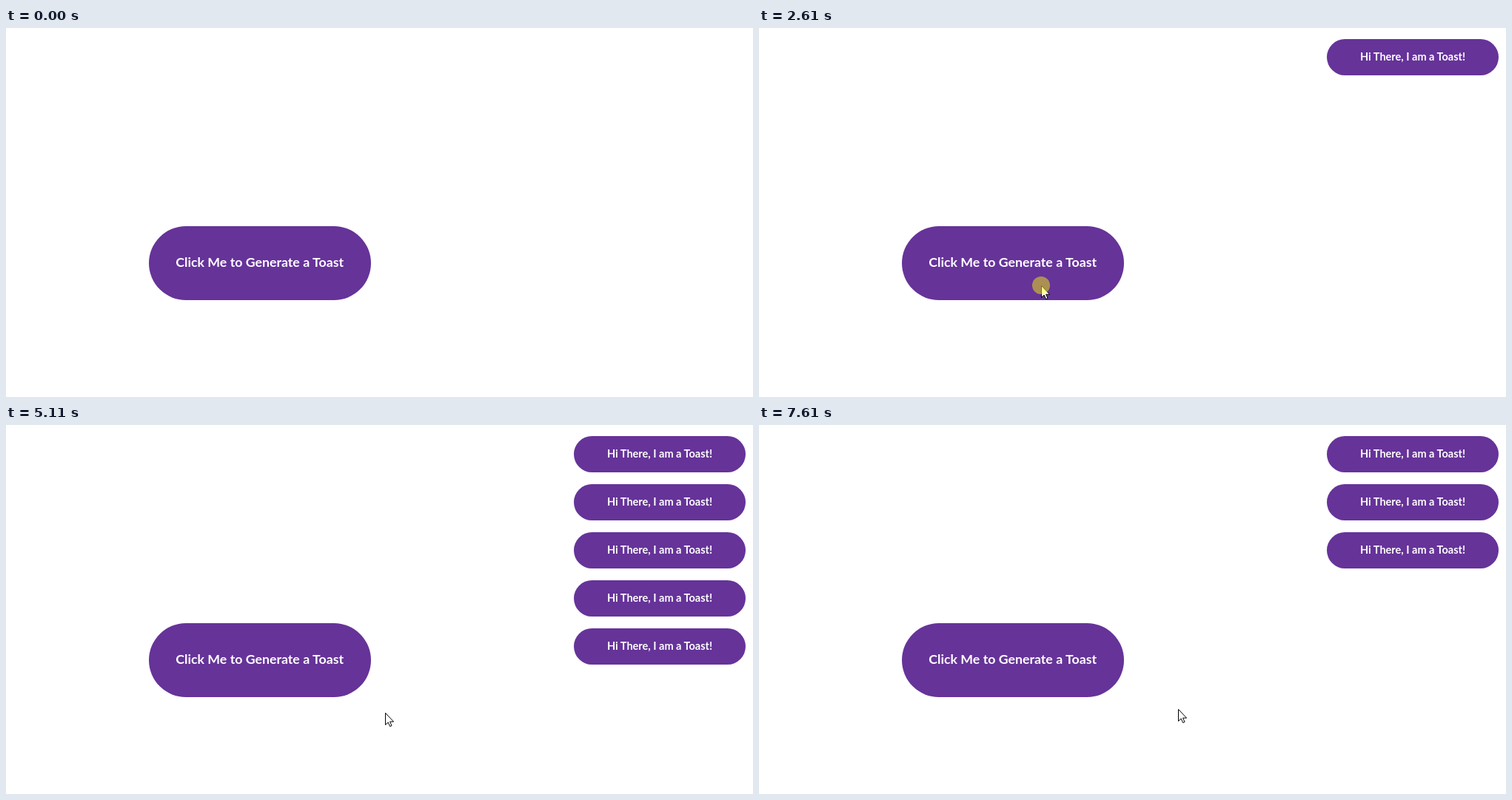
Animation, 1009 px wide and 499 px high, one loop 8000 ms. Source, as an HTML page:

```html
<!DOCTYPE html>
<html lang="en">
<head>
<meta charset="utf-8">
<title>Toasts</title>
<style>
  html, body { margin: 0; width: 100%; height: 100%; overflow: hidden; background: #fff; }
  svg { display: block; width: 1009px; height: 499px; }
  rect { fill: #639; }
  text { fill: #fff; font: 700 17.75px Lato, "Open Sans", sans-serif; text-anchor: middle; }
  .toast text { font-size: 14.5px; }
</style>
</head>
<body>
<svg viewBox="0 0 1009 499">
  <rect x="193" y="268" width="300" height="100" rx="50"/>
  <text x="342.7" y="323">Click Me to Generate a Toast</text>
  <g id="toasts"></g>
  <g id="cursor">
    <path d="M.5 .5V16.5L4.2 13.1L6.6 18.6L9 17.6L6.6 12.2H11.6Z" fill="#fff" stroke="#000" stroke-linejoin="round"/>
    <circle id="press" r="12" fill="#ff0" fill-opacity=".46"/>
  </g>
</svg>
<script>
const LOOP = 8000;
const STEP = 48;         // pace of the cursor
const FIRST_EXIT = 7050; // newest toast leaves first,
const EXIT_GAP = 560;    // the others follow at this interval

// Mouse down and up; every release adds a toast
const clicks = [[1970, 2120], [2610, 2660], [2840, 3120], [3450, 3500], [3910, 3960]];

const moves = [
  { start: 340, end: 390, from: [789, 488], to: [704, 490], gone: 440 },
  { start: 1310, end: 1740, from: [383, 452], to: [381, 348] },
  { start: 4930, end: 5160, from: [393, 351], to: [577, 410] },
  { start: 6590, end: 6820, from: [577, 407], to: [566, 384] }
];

const byId = id => document.getElementById(id);
const show = (el, on) => el.setAttribute("visibility", on ? "visible" : "hidden");
const smooth = u => u * u * (3 - 2 * u);

byId("toasts").innerHTML = clicks.map((_, i) =>
  `<g class="toast" transform="translate(767 ${15 + 65 * i})">
    <rect width="232" height="49" rx="24.5"/>
    <text x="116" y="29">Hi There, I am a Toast!</text>
  </g>`).join("");
const toasts = [...byId("toasts").children];

function cursorAt(t) {
  const move = moves.findLast(m => t >= m.start);
  if (!move || t >= move.gone) return null;
  const { start, end, from, to } = move;
  const steps = Math.round((end - start) / STEP);
  const step = Math.floor((t - start) / (end - start) * steps + 0.01);
  const k = smooth(Math.min(1, step / steps));
  return from.map((v, i) => Math.round(v + (to[i] - v) * k));
}

function draw(t) {
  toasts.forEach((el, i) => {
    const exit = FIRST_EXIT + EXIT_GAP * (toasts.length - 1 - i);
    show(el, t >= clicks[i][1] && t < exit);
  });
  const pos = cursorAt(t);
  show(byId("cursor"), pos);
  show(byId("press"), pos && clicks.some(([down, up]) => t >= down && t < up));
  if (pos) byId("cursor").setAttribute("transform", `translate(${pos})`);
}

const begin = performance.now();
function tick() {
  draw((performance.now() - begin) % LOOP);
  requestAnimationFrame(tick);
}
tick();
</script>
</body>
</html>
```
